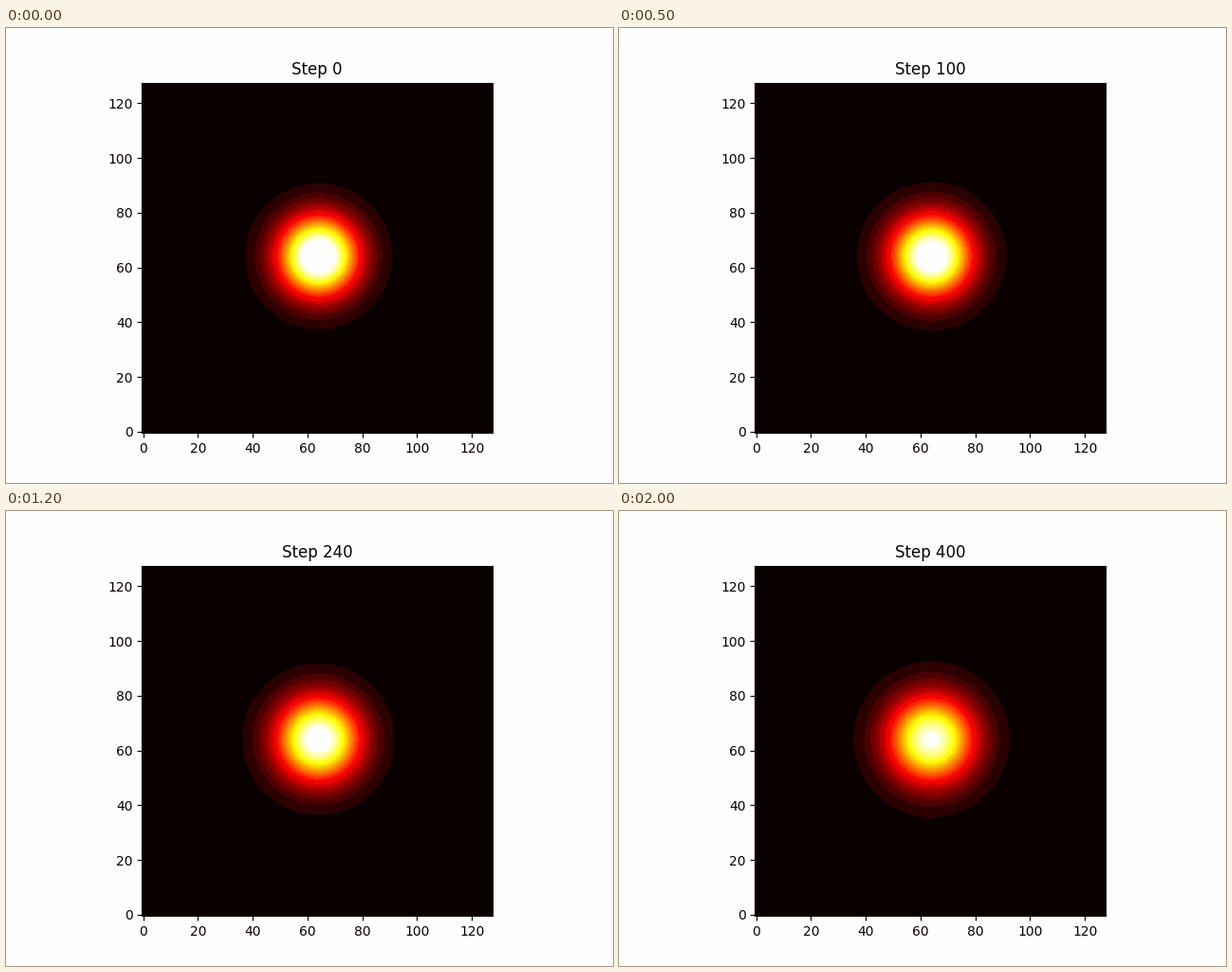
Recreate the animation shown at these times as a matplotlib script. Size 640 by 480 pixels, loop 2100 ms.

```python
import numpy as np
import matplotlib.pyplot as plt
from matplotlib.animation import FuncAnimation
from matplotlib.colors import ListedColormap

N = 128             # grid cells per side
FRAMES = 21
STEPS = 20          # solver steps per frame
GROWTH = 0.05       # variance gained per step (2 * D * dt)
VAR0 = 100.0
VAR_END = VAR0 + GROWTH * STEPS * (FRAMES - 1)
INK, PAPER = "#0a0000", "#fefefe"


def banded_hot():
    """'hot' reduced to 3/4/3 bits per channel, each band in its mean colour."""
    lut = (plt.get_cmap("hot")(np.arange(256))[:, :3] * 255).astype(int)
    r, g, b = lut.T
    key = (r >> 5) * 1000 + (g >> 4) * 10 + (b >> 5)
    weight = 1 / (np.arange(256) + 0.5)   # area a Gaussian gives each level
    out = np.empty((256, 3))
    for k in np.unique(key):
        band = key == k
        out[band] = np.floor(np.average(lut[band], axis=0, weights=weight[band]) + 1e-6)
    out[key == key[0]] = (10, 0, 0)
    out[key == key[-1]] = 254
    return ListedColormap(out / 255)


y, x = np.mgrid[:N, :N]
r2 = (x - N // 2) ** 2 + (y - N // 2) ** 2


def heat(step):
    """Diffusing Gaussian, scaled so that its last peak is 1."""
    var = VAR0 + GROWTH * step
    return VAR_END / var * np.exp(-r2 / (2 * var))


plt.rcParams.update({
    "font.family": "DejaVu Sans",
    "text.color": INK,
    "axes.edgecolor": INK,
    "xtick.color": INK,
    "ytick.color": INK,
})

fig, ax = plt.subplots(figsize=(6.4, 4.8), dpi=100, facecolor=PAPER)
im = ax.imshow(heat(0), cmap=banded_hot(), vmin=0, vmax=1,
               origin="lower", interpolation="hanning")
title = ax.set_title("Step 0")


def update(i):
    step = i * STEPS
    im.set_data(heat(step))
    title.set_text(f"Step {step}")
    return im, title


anim = FuncAnimation(fig, update, frames=FRAMES, interval=100, repeat=True)
plt.show()
```
